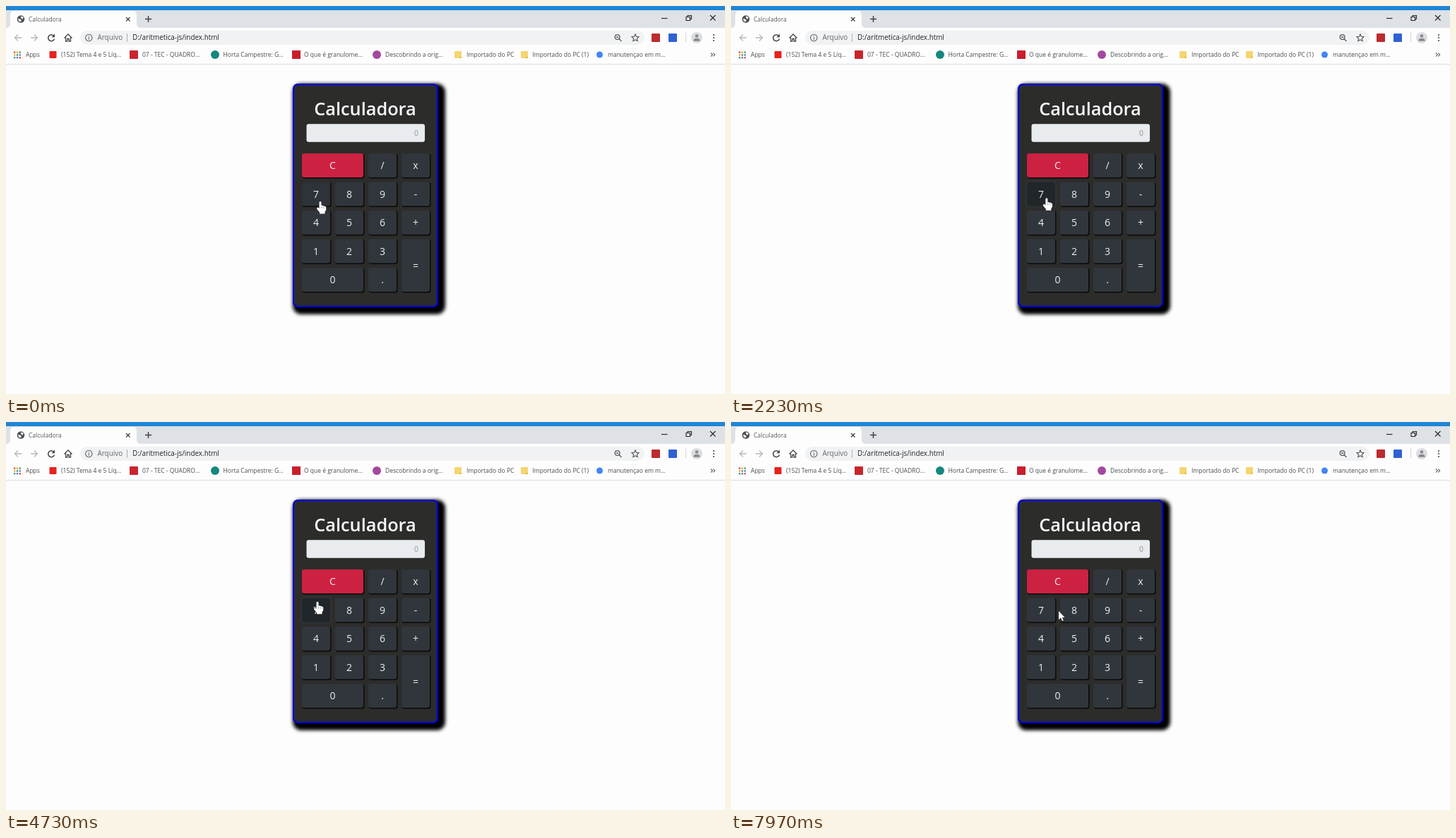
Recreate the animation shown at these times as an HTML page with a canvas. Size 1018x550 px, loop 8000 ms.

```html
<!DOCTYPE html>
<html lang="pt">
<head>
<meta charset="utf-8">
<title>Calculadora</title>
<style>
  html, body { margin: 0; width: 100%; height: 100%; overflow: hidden; background: #fdfdfd; }
  canvas { display: block; }
</style>
</head>
<body>
<canvas id="stage" width="1018" height="550"></canvas>
<script>
const ctx = document.getElementById('stage').getContext('2d');
const LOOP = 8000;
const FONT = '"Open Sans", "Noto Sans", sans-serif';
const RELOAD = { x: 64, y: 45 };
const DRAG = [1700, 3420];
const FOCUS = [1000, 7100];

// Pointer hotspot: time, x, y
const PATH = [
  [0, 445, 277], [700, 447, 275], [1130, 446, 274], [1630, 446, 274],
  [2450, 447, 272], [3130, 522, 306], [3420, 530, 309], [3580, 535, 282],
  [3700, 539, 237], [3950, 540, 236], [4600, 441, 255], [4940, 441, 254],
  [5200, 447, 318], [5770, 190, 96], [6200, 58, 13], [6340, 56, 26],
  [6640, 62, 43], [7470, 62, 44], [7800, 464, 268], [8000, 464, 268]
];

const COLS = [419, 466, 513, 560], ROWS = [209, 249.5, 290, 330.5, 371];
const key = (label, col, row, wide = 1, tall = 1) => ({
  label, x: COLS[col], y: ROWS[row], w: 40 + 47 * (wide - 1), h: 34 + 40.5 * (tall - 1)
});
const KEYS = [
  key('C', 0, 0, 2), key('/', 2, 0), key('x', 3, 0),
  key('7', 0, 1), key('8', 1, 1), key('9', 2, 1), key('-', 3, 1),
  key('4', 0, 2), key('5', 1, 2), key('6', 2, 2), key('+', 3, 2),
  key('1', 0, 3), key('2', 1, 3), key('3', 2, 3), key('=', 3, 3, 1, 2),
  key('0', 0, 4, 2), key('.', 2, 4)
];
const SEVEN = KEYS[3];

const within = (t, [from, to]) => t >= from && t < to;

function pointerAt(t) {
  const i = PATH.findIndex(p => p[0] > t);
  const [t0, x0, y0] = PATH[i - 1], [t1, x1, y1] = PATH[i];
  const u = (t - t0) / (t1 - t0), e = u * u * (3 - 2 * u);
  return { x: x0 + (x1 - x0) * e, y: y0 + (y1 - y0) * e };
}

function hoveredKey(t) {
  const p = pointerAt(t);
  const hit = KEYS.find(k => p.x >= k.x && p.x <= k.x + k.w && p.y >= k.y && p.y <= k.y + k.h);
  return within(t, DRAG) && hit !== SEVEN ? undefined : hit;
}

// Share of the last 150 ms spent over a key, which acts as a short colour fade
function hoverAmount(k, t) {
  let n = 0;
  for (let i = 0; i < 6; i++) if (hoveredKey((t - i * 25 + LOOP) % LOOP) === k) n++;
  return n / 6;
}

const mix = (a, b, u) => `rgb(${a.map((v, i) => Math.round(v + (b[i] - v) * u))})`;

function box(x, y, w, h, r, fill) {
  ctx.fillStyle = fill;
  ctx.beginPath();
  ctx.roundRect(x, y, w, h, r);
  ctx.fill();
}
function disc(x, y, r, fill) {
  ctx.fillStyle = fill;
  ctx.beginPath();
  ctx.arc(x, y, r, 0, 7);
  ctx.fill();
}
function line(d, color, width = 1.3) {
  ctx.strokeStyle = color;
  ctx.lineWidth = width;
  ctx.stroke(new Path2D(d));
}
function text(s, x, y, size, color, align = 'left', weight = 400) {
  ctx.font = `${weight} ${size}px ${FONT}`;
  ctx.textAlign = align;
  ctx.fillStyle = color;
  ctx.fillText(s, x, y);
}
// Blurred box alone: the box itself stays outside the stage
function softBox(x, y, w, h, r, blur) {
  ctx.save();
  ctx.shadowColor = '#000';
  ctx.shadowBlur = blur;
  ctx.shadowOffsetX = 2000;
  box(x - 2000, y, w, h, r, '#000');
  ctx.restore();
}

function drawTabs() {
  box(0, 0, 1018, 7, 0, '#1f87d6');
  box(0, 6, 1018, 25, 0, '#dee1e5');
  ctx.fillStyle = '#fdfdfd';
  ctx.fill(new Path2D('M0 31Q6 31 6 25V13Q6 7 12 7H179Q185 7 185 13V25Q185 31 191 31Z'));
  disc(21, 18.5, 5.3, '#4d5155');
  ctx.fillStyle = '#fdfdfd';
  ctx.fill(new Path2D('M17 18L20 18.5L22 20.5L20 22.5L18 21ZM21 14.5L24.5 15.5L24 18.5L21.5 17.5Z'));
  text('Calculadora', 32, 21.7, 8.5, '#55595d');
  line('M170 16L175.500 21.500M175.500 16L170 21.500', '#3c4043');
  line('M197 18.500H206M201.500 14V23', '#3c4043', 1.4);
  line('M928 17.500H936.500', '#222', 1.1);
  line('M963 15.500H968.500V20.500H963ZM965 15V13.500H970.500V18.500H969', '#222', 1.1);
  line('M997 13L1004.500 20.500M1004.500 13L997 20.500', '#222', 1.1);
}

function drawToolbar(t) {
  box(0, 31, 1018, 51, 0, '#fdfdfd');
  box(0, 82, 1018, 1, 0, '#dcdddf');
  box(105, 35, 799, 20, 10, '#f0f2f3');
  const p = pointerAt(t);
  if (Math.hypot(p.x - RELOAD.x, p.y - RELOAD.y) < 11) disc(RELOAD.x, RELOAD.y, 10.5, '#e5e7e9');

  line('M22 45H12.500M17 40.500L12.500 45L17 49.500', '#b4b7ba');
  line('M35 45H44.500M40 40.500L44.500 45L40 49.500', '#b4b7ba');
  line('M67.400 42A4.500 4.500 0 1 0 68.500 46.500', '#44484b', 1.5);
  ctx.fillStyle = '#44484b';
  ctx.fill(new Path2D('M69 39.500V44.300H64.300Z'));
  line('M82.500 45.500L88 40L93.500 45.500M84.500 44.500V50H86.800V46.500H89.200V50H91.500V44.500', '#44484b');

  line('M122 45A4.700 4.700 0 1 1 112.600 45A4.700 4.700 0 1 1 122 45M117.300 44.200V47.700M117.300 42.200V43.300', '#5f6368', 1.1);
  text('Arquivo', 129.5, 48.3, 9.9, '#65696d');
  box(171, 39, 1, 12, 0, '#aeb1b4');
  text('D:/aritmetica-js/index.html', 179, 48.3, 9.9, '#25282b');

  line('M869 44A3.400 3.400 0 1 1 862.200 44A3.400 3.400 0 1 1 869 44M868 46.500L871.500 50M864 44H867.200', '#55595d');
  ctx.beginPath();
  for (let i = 0; i < 10; i++) {
    const a = i * Math.PI / 5 - Math.PI / 2, r = i % 2 ? 2.5 : 5.3;
    ctx.lineTo(891 + r * Math.cos(a), 45.3 + r * Math.sin(a));
  }
  ctx.closePath();
  ctx.lineWidth = 1.1;
  ctx.strokeStyle = '#4d5155';
  ctx.stroke();
  box(914, 39, 12, 12, 1, '#bd2b2f');
  box(938, 39, 12, 12, 1, '#2f62d3');
  box(962, 38, 1, 13, 0, '#d3d5d8');
  disc(978, 45, 8, '#dcdee1');
  disc(978, 42.5, 2.3, '#85898d');
  box(973.5, 46, 9, 3.8, [3, 3, 0, 0], '#85898d');
  for (const y of [41, 45, 49]) disc(1002, y, 1.1, '#44484b');
}

function drawBookmarks() {
  const appColors = ['#d9483b', '#e8a33a', '#3f9a59', '#4678d8'];
  for (let i = 0; i < 9; i++)
    box(11 + i % 3 * 3.8, 64.5 + (i / 3 | 0) * 3.8, 2.3, 2.3, 0, appColors[(i % 3 + (i / 3 | 0)) % 4]);
  box(61.5, 64, 10, 10, 1, '#e8221e');
  box(175, 63, 12, 12, 1, '#c9252d');
  disc(296, 69, 6, '#16867f');
  box(405, 63, 12, 12, 0, '#c81e2c');
  disc(525, 69, 6, '#a3489f');
  for (const x of [635, 729]) {
    box(x, 64, 10, 10, 1, '#f5d56f');
    box(x + 7, 72, 3, 2, 0, '#e7bd4b');
  }
  disc(840.5, 69, 4.5, '#4285f4');
  const labels = [
    ['Apps', 28], ['(152) Tema 4 e 5 Líq...', 78], ['07 - TEC - QUADRO...', 193],
    ['Horta Campestre: G...', 307.5], ['O que é granulome...', 422], ['Descobrindo a orig...', 537],
    ['Importado do PC', 652], ['Importado do PC (1)', 745.5], ['manutençao em m...', 852]
  ];
  for (const [s, x] of labels) text(s, x, 72.2, 8.5, '#484c50');
  line('M998 66.500L1000.300 69L998 71.500M1001.300 66.500L1003.600 69L1001.300 71.500', '#44484b', 1.1);
}

function drawKey(k, t) {
  const focused = k === SEVEN && within(t, FOCUS);
  const pressed = focused && t < DRAG[1];
  const u = pressed ? 1 : hoverAmount(k, t);
  if (focused) box(k.x - 2, k.y - 2, k.w + 4, k.h + 4, 4, 'rgba(52,58,64,0.5)');
  else box(k.x + 0.5, k.y + 0.5, k.w + 1, k.h + 1, 3, '#0a0b0b');
  const fill = k.label === 'C' ? '#cd2142' : mix([48, 54, 59], [32, 38, 41], u);
  box(k.x, k.y, k.w, k.h, 3, fill);
  text(k.label, k.x + k.w / 2, k.y + k.h / 2 + 5.2, 14, '#eef0f1', 'center');
}

function drawCalculator(t) {
  softBox(406, 110, 216, 327, 12, 5);
  box(406, 110, 206, 317, 7, '#0500d8');
  box(408.2, 112.2, 201.6, 312.6, 5, '#2c2c2b');
  text('Calculadora', 508.5, 155, 25.3, '#fafafa', 'center', 600);
  box(425.5, 167.3, 167.5, 25.4, 3, '#e9ecef');
  text('0', 584, 184.2, 10.3, '#8d9297', 'right');
  for (const k of KEYS) drawKey(k, t);
}

const ARROW = new Path2D('M0 0V12.200L2.900 9.600L4.900 14.100L6.900 13.200L5 8.900H8.700Z');
const HAND = new Path2D('M-1.500 1Q0 -1 1.500 1V6Q3 5 4 6.500Q5.500 5.500 6.300 7.200Q8 6.700 8.200 8.500V12L6.500 15V17.500H-1V15.500L-4.800 11Q-5.500 8.500 -3.300 8.500L-1.500 10Z');

function drawPointer(t) {
  const { x, y } = pointerAt(t), hand = hoveredKey(t);
  const shape = hand ? HAND : ARROW;
  ctx.save();
  ctx.translate(x, y);
  ctx.lineJoin = 'round';
  ctx.lineWidth = 1.2;
  ctx.strokeStyle = '#25282b';
  ctx.stroke(shape);
  ctx.fillStyle = '#fff';
  ctx.fill(shape);
  if (hand) line('M1.500 7V10M4 7.500V10M6.300 8.200V10', '#777', 0.6);
  ctx.restore();
}

function draw(t) {
  ctx.fillStyle = '#fdfdfd';
  ctx.fillRect(0, 0, 1018, 550);
  drawTabs();
  drawToolbar(t);
  drawBookmarks();
  drawCalculator(t);
  drawPointer(t);
}

const start = performance.now();
function tick() {
  draw((performance.now() - start) % LOOP);
  requestAnimationFrame(tick);
}
tick();
</script>
</body>
</html>
```
